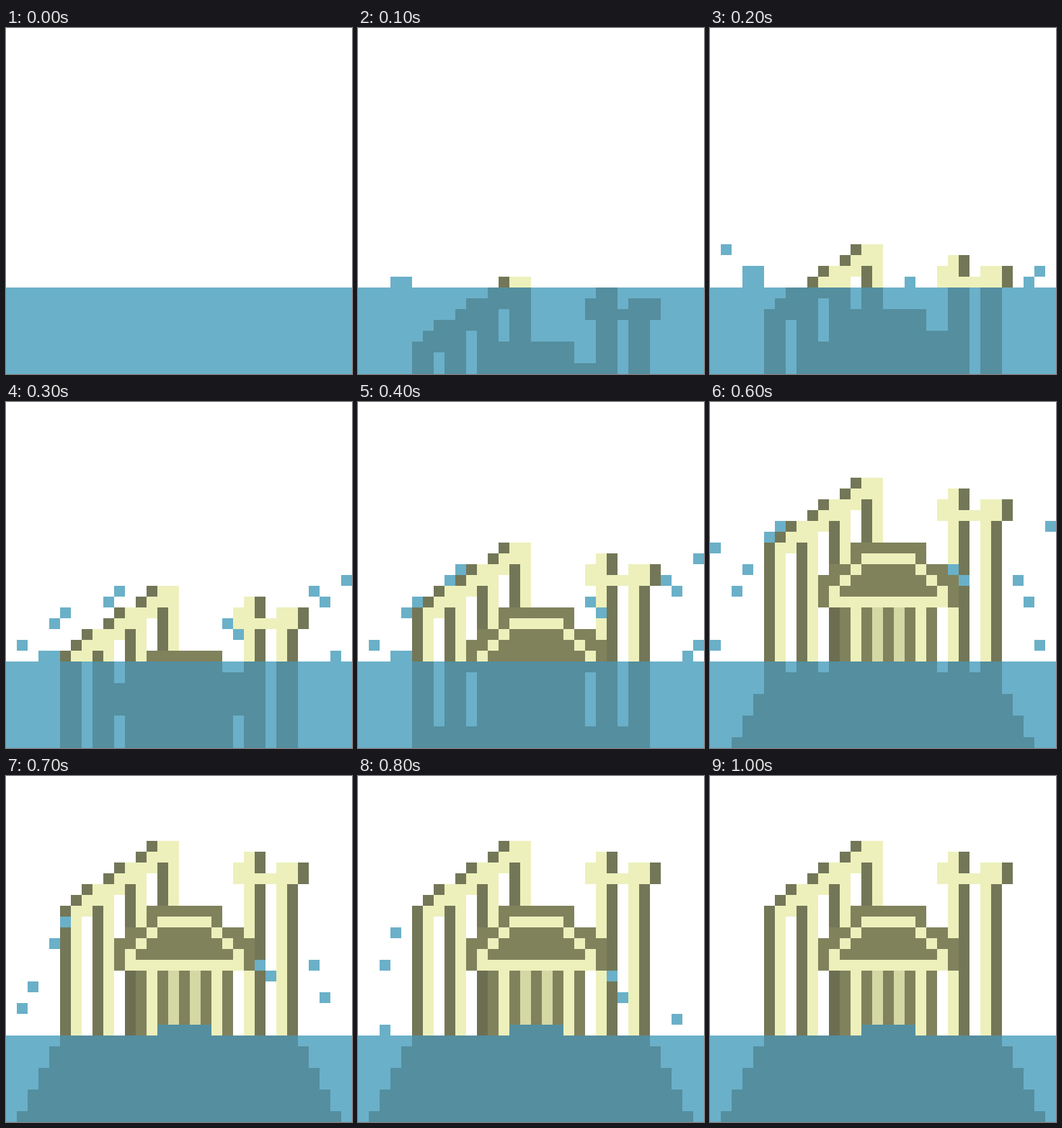
An HTML page with a canvas for the animation above (1300 ms loop, 512 by 512 pixels).

```html
<!DOCTYPE html>
<html lang="en">
<head>
<meta charset="utf-8">
<title>Rising ruin</title>
<style>
  html, body { margin: 0; width: 100%; height: 100%; overflow: hidden; background: #fff; }
  canvas { display: block; width: 100vw; height: 100vh; }
</style>
</head>
<body>
<canvas id="stage" width="512" height="512"></canvas>
<script>
const ctx = document.getElementById('stage').getContext('2d');
const CELL = 16, SIZE = 32, SEA = 24, STEP = 100, LOOP = 1300, LAST = 10;
const water = '#6ab0c8', shade = '#548e9f';
const light = '#edf0bb', dark = '#737757', mid = '#80825c', pale = '#d4d8a4', deep = '#6c6e52';

// The ruin rises evenly and stops; the rock beneath it eases into place.
const sinkAt = step => Math.max(0, Math.round(3.2 * (7 - step) - 2.2));
const rockAt = step => 23 + Math.round(0.44 * Math.max(0, 8 - step) ** 2);

function box(color, x, y, w = 1, h = 1) {
  ctx.fillStyle = color;
  ctx.fillRect(x * CELL, y * CELL, w * CELL, h * CELL);
}

function ruin(dy, tint) {
  const put = (color, x, y, w, h) => box(tint || color, x, y + dy, w, h);
  const pole = (x, y, left, right) => {
    put(left, x, y, 1, SEA - y);
    put(right, x + 1, y, 1, SEA - y);
  };

  // broken beam and its columns
  for (let i = 0; i < 7; i++) {
    const x = Math.max(5, Math.ceil(13 - 1.5 * i));
    put(dark, x, 6 + i);
    put(light, x + 1, 6 + i, Math.min(3, 15 - x));
  }
  for (let i = 0; i < 4; i++) pole(5 + 3 * i, Math.min(12, 14 - 2 * i), dark, light);

  // right gate
  pole(22, 7, light, dark);
  pole(25, 8, light, dark);
  put(light, 21, 8);
  put(light, 21, 9, 6);
  put(light, 26, 8);
  put(dark, 27, 8, 1, 2);

  // roof
  put(mid, 13, 12, 7, 2);
  put(mid, 11, 14, 11);
  put(mid, 10, 15, 13, 3);
  put(light, 14, 13, 5);
  for (let i = 0; i < 3; i++) {
    put(light, 13 - i, 14 + i);
    put(light, 19 + i, 14 + i);
  }
  put(light, 11, 17, 11);

  // hall
  put(deep, 11, 18, 1, 6);
  put(mid, 12, 18, 9, 6);
  for (let x = 13; x < 20; x += 2) put(x === 13 || x === 19 ? light : pale, x, 18, 1, 6);
}

function rock(top) {
  if (top < SEA) box(shade, 14, top, 5);
  for (let y = Math.max(top, SEA); y < SIZE; y++) {
    const spread = Math.floor((y - top) / 2);
    box(shade, 5 - spread, y, 22 + 2 * spread);
  }
}

function splash(step) {
  // x, y is the highest point; rise and fall are rows per step around it
  const drop = (x, y, { peak = 6, drift = 0, rise = 1.5, fall = 2, from = 3, to = 8 }) => {
    if (step < from || step > to) return;
    const t = step - peak;
    const row = Math.round(y + (t < 0 ? -rise : fall) * t);
    if (row < SEA) box(water, Math.round(x + drift * t), row);
  };

  // pairs flung off the ruin
  drop(6, 11, { drift: -1.4, rise: 2, fall: 1.5 });
  drop(5, 12, { drift: -1.4, rise: 2, fall: 2.5 });
  drop(3, 15, { drift: -0.75, rise: 1.4, fall: 4 });
  drop(2, 17, { drift: -0.75, rise: 0.9, fall: 4 });
  drop(22, 15, { drift: 0.7, fall: 1.5 });
  drop(23, 16, { drift: 0.7 });
  drop(28, 15, { peak: 5, rise: 1, fall: 1, to: 7 });
  drop(29, 16, { peak: 5, rise: 1 });

  // high drops at the edges
  drop(0, 13, { drift: -0.4, rise: 4.5, to: 6 });
  drop(31, 11, { to: 6 });

  // first spurts and low spray
  const spurt = { peak: 2, from: 2, to: 3 };
  drop(1, 20, spurt);
  drop(18, 23, spurt);
  drop(30, 22, spurt);
  drop(0, 22, { drift: -3, rise: 0, from: 5, to: 6 });
  drop(30, 22, { drift: -0.6, rise: 0, from: 4, to: 6 });
  drop(30, 23, { peak: 4, drift: 0.5, rise: 0, from: 2, to: 4 });

  // swell on the left
  const swell = Math.round(22 + Math.abs(step - 2) / 2);
  if (swell < SEA) box(water, 3, swell, 2, SEA - swell);
}

function draw(step) {
  box('#fff', 0, 0, SIZE, SIZE);
  if (step > 0) ruin(sinkAt(step));
  box(water, 0, SEA, SIZE, SIZE - SEA);
  if (step === 0) return;

  ctx.save();
  ctx.beginPath();
  ctx.rect(0, SEA * CELL, SIZE * CELL, (SIZE - SEA) * CELL);
  ctx.clip();
  ruin(sinkAt(step), shade);
  ctx.restore();
  rock(rockAt(step));
  splash(step);
}

const start = performance.now();
let shown = -1;
function tick() {
  const time = (performance.now() - start) % LOOP;
  const step = Math.min(LAST, Math.floor(time / STEP));
  if (step !== shown) draw(shown = step);
  requestAnimationFrame(tick);
}
tick();
</script>
</body>
</html>
```
